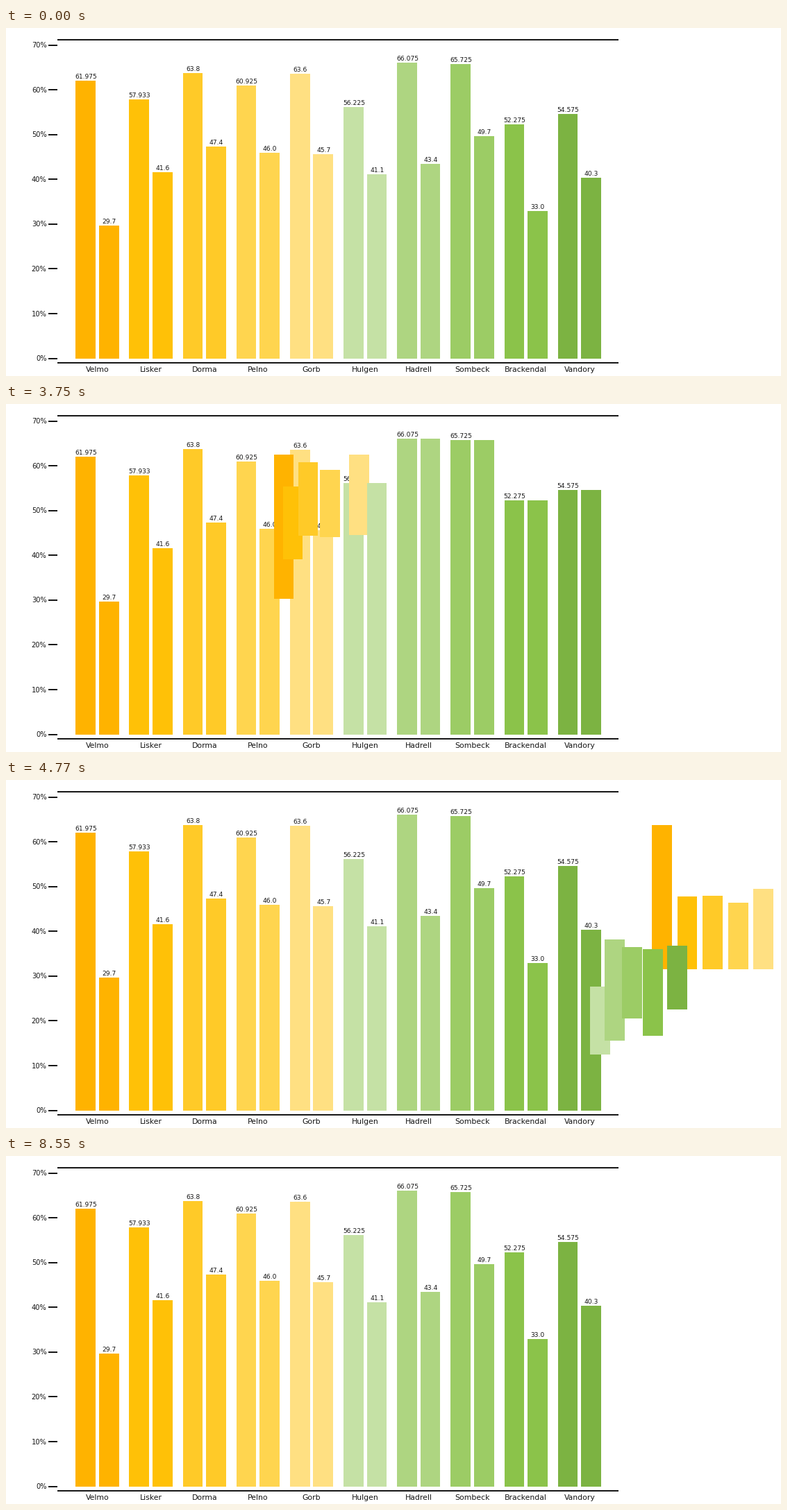
Recreate the animation shown at these times as a matplotlib script. Size 1116 by 502 pixels, loop 9 s.

```python
import numpy as np
import matplotlib.pyplot as plt
from matplotlib.animation import FuncAnimation
from matplotlib.patches import Rectangle

W, H, DPI = 1116, 502, 100
STEP, LOOP = 30, 9000  # ms
BASE, PER_PCT = 476.6, 6.457
BAR_W, PAIR_GAP = 28.7, 33.5
INK = "#161616"

# name, high, low, colour
ROWS = [
    ("Velmo", "61.975", "29.7", "#FFB300"),
    ("Lisker", "57.933", "41.6", "#FFC107"),
    ("Dorma", "63.8", "47.4", "#FFCA28"),
    ("Pelno", "60.925", "46.0", "#FFD54F"),
    ("Gorb", "63.6", "45.7", "#FFE082"),
    ("Hulgen", "56.225", "41.1", "#C5E1A5"),
    ("Hadrell", "66.075", "43.4", "#AED581"),
    ("Sombeck", "65.725", "49.7", "#9CCC65"),
    ("Brackendal", "52.275", "33.0", "#8BC34A"),
    ("Vandory", "54.575", "40.3", "#7CB342"),
]

plt.rcParams["font.family"] = "DejaVu Sans"
# The small margin keeps float rounding from dropping a pixel.
fig = plt.figure(figsize=((W + 0.01) / DPI, (H + 0.01) / DPI), dpi=DPI,
                 facecolor="white")
ax = fig.add_axes([0, 0, 1, 1])
ax.set_xlim(0, W)
ax.set_ylim(H, 0)
ax.axis("off")


def px(size):
    return size * 72 / DPI


def level(pct):
    return BASE - pct * PER_PCT


def rect(x, top, bottom, color, z):
    patch = Rectangle((x, top), BAR_W, bottom - top, fc=color, lw=0, zorder=z)
    return ax.add_patch(patch)


def label(x, y, text, size, ha="center"):
    ax.text(x, y, text, fontsize=px(size), color=INK, ha=ha,
            va="baseline", zorder=3)


def rule(x0, x1, y):
    ax.plot([x0, x1], [y, y], color=INK, lw=px(2), solid_capstyle="butt")


rule(74, 882, 17)
rule(74, 882, 483)
for pct in range(0, 80, 10):
    rule(61, 74, level(pct))
    label(58.5, level(pct) + 3.6, f"{pct}%", 9.9, "right")

movers = []
for i, (name, high, low, color) in enumerate(ROWS):
    x = 100.3 + 77.15 * i
    for left, value in ((x, high), (x + PAIR_GAP, low)):
        top = level(float(value))
        rect(left, top, BASE, color, 2)
        label(left + BAR_W / 2 + 0.4, top - 3, value, 9.2)
    label(x + 31.2, 495.8, name, 10.9)

    row, col = divmod(i, 5)
    top, bottom = level(float(high)), level(float(low))
    start = np.array([x + PAIR_GAP, top])
    end = np.array([930 + 36.6 * col, (273, 446.6)[row] - (bottom - top)])
    patch = rect(*start, bottom, color, 4 + i)
    depart = 3300 + 630 * row + 60 * col
    movers.append((patch, start, end, 1800 + 60 * i, depart))


def ramp(t, begin, length):
    return min(max((t - begin) / length, 0), 1)


def update(frame):
    t = frame * STEP
    fade_out = 1 - ramp(t, 8100, 450)
    for patch, start, end, appear, depart in movers:
        u = ramp(t, depart, 1200)
        patch.set_xy(start + (end - start) * u * u * (3 - 2 * u))
        alpha = ramp(t, appear, 390) * fade_out
        patch.set_alpha(alpha)
        patch.set_visible(alpha > 0)
    return [m[0] for m in movers]


anim = FuncAnimation(fig, update, frames=LOOP // STEP, interval=STEP,
                     repeat=True, repeat_delay=0, blit=False)
plt.show()
```
